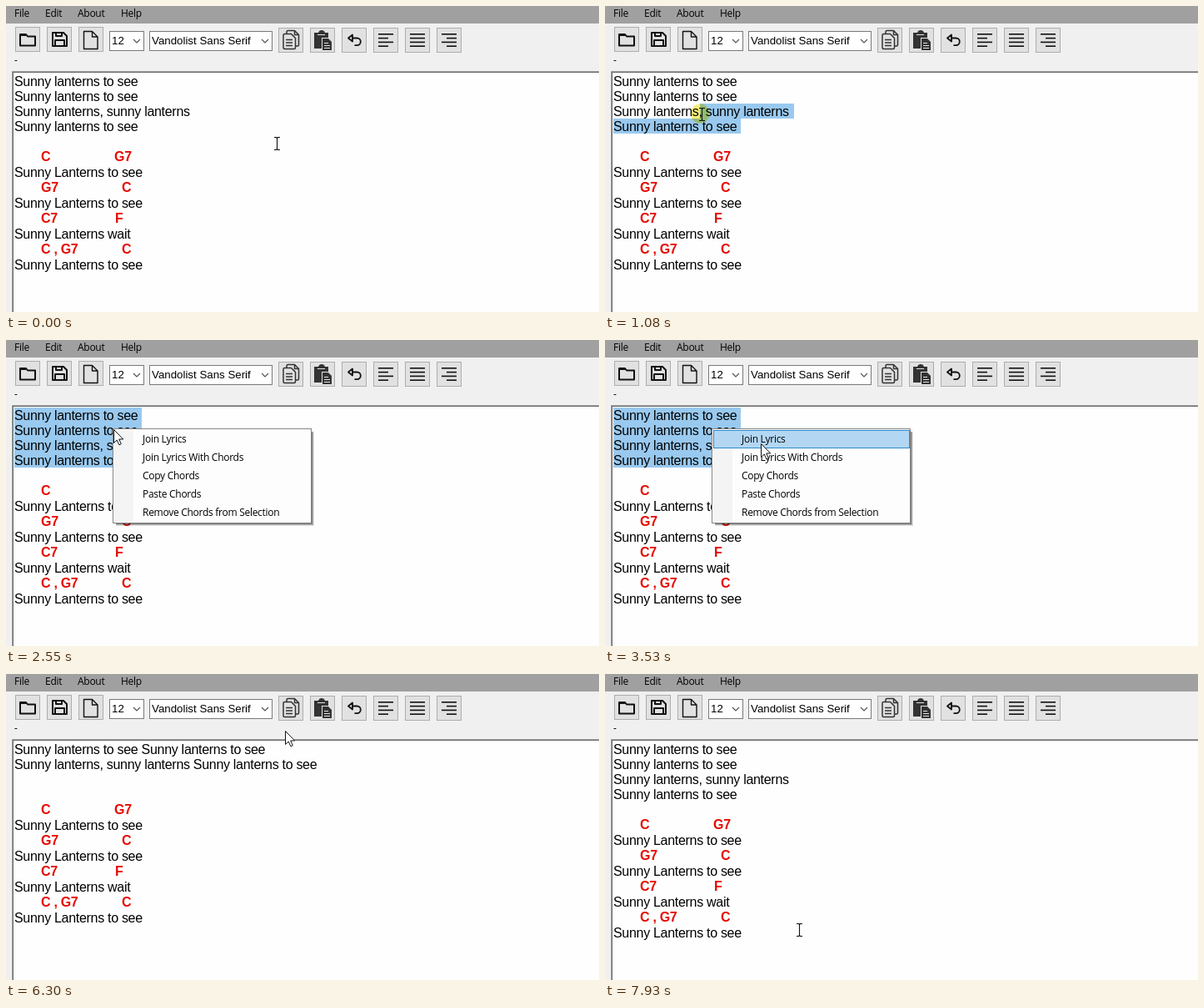
An HTML page that plays this animation: 712x367 px, repeating every 8 s.

```html
<!DOCTYPE html>
<html lang="en">
<head>
<meta charset="utf-8">
<title>Chord sheet editor</title>
<style>
  html, body { margin: 0; width: 100%; height: 100%; overflow: hidden; background: #f0f0f0; }
  svg { display: block; width: 712px; height: 367px; }
  text { white-space: pre; }
  .ui { font: 12px "Open Sans", sans-serif; letter-spacing: -.28px; fill: #000; }
  .combo { font: 13.3px "Liberation Sans", Arial, sans-serif; }
  .lyric, .chord { font: 16px "Liberation Sans", Arial, sans-serif; letter-spacing: -.3px; fill: #000; }
  .chord { font-weight: bold; fill: #e60a00; }
  .line { fill: none; stroke: #111; stroke-width: 2; stroke-linejoin: round; }
  .crisp { shape-rendering: crispEdges; }
  #spot { mix-blend-mode: multiply; }
</style>
</head>
<body>
<svg id="stage" viewBox="0 0 712 367" xmlns="http://www.w3.org/2000/svg"></svg>
<script>
const NS = 'http://www.w3.org/2000/svg';
const stage = document.getElementById('stage');
const LOOP = 8000, ROW = 18, TOP = 81, LEFT = 10;

function add(parent, tag, attrs = {}, content = '') {
  const el = document.createElementNS(NS, tag);
  for (const key in attrs) el.setAttribute(key, attrs[key]);
  el.textContent = content;
  return parent.appendChild(el);
}
const group = parent => add(parent, 'g');
const rect = (parent, x, y, width, height, fill, extra) =>
  add(parent, 'rect', { x, y, width, height, fill, class: 'crisp', ...extra });
const text = (parent, x, y, cls, content) => add(parent, 'text', { x, y, class: cls }, content);
const path = (parent, d, style = '') => add(parent, 'path', { d, class: 'line', style });
const frame = (parent, x, y, w, h, fill, stroke) =>
  rect(parent, x + .5, y + .5, w - 1, h - 1, fill, { stroke });
const show = (el, on) => el.setAttribute('visibility', on ? 'visible' : 'hidden');

// Window chrome
rect(stage, 0, 0, 712, 367, '#f0f0f0');
rect(stage, 0, 0, 712, 21, '#a0a0a0');
[['File', 10], ['Edit', 47], ['About', 86], ['Help', 138]].forEach(([s, x]) => text(stage, x, 13, 'ui', s));
text(stage, 10, 69, 'ui', '-');
rect(stage, 7, 78, 705, 289, '#a0a0a0');
rect(stage, 8, 79, 704, 288, '#696969');
rect(stage, 9, 80, 703, 287, '#fefefe');

const button = (x, y) => frame(stage, x, y, 30, 30, '#e1e1e1', '#adadad');
[11, 49, 87].forEach(x => button(x, 25));
[327, 365, 441, 479, 517].forEach(x => button(x, 26));
const undoButton = button(403, 26);

function combo(x, width, label) {
  frame(stage, x, 30, width, 24, '#fff', '#7a7a7a');
  text(stage, x + 3, 46, 'combo', label);
  path(stage, `M${x + width - 13} 40l4 4 4-4`, 'stroke:#555;stroke-width:1.1');
}
combo(124, 42, '12');
combo(172, 148, 'Vandolist Sans Serif');

// Toolbar icons
path(stage, 'M17 34h7l2 2.500h9v11h-18zM17 35h7');
path(stage, 'M56 32h13l4 4v12h-17zM60 32v4h7v-4M59 48v-7h11v7');
path(stage, 'M93.500 30.500h10l6.500 6.500v14.500h-16.500zM103.500 30.500v6.500h6.500', 'stroke-width:1.4');
path(stage, 'M337 33v-2q0-1.500 1.500-1.500h8l5 5v12q0 1.500-1.500 1.500h-2M346.500 29.500v5h5', 'stroke:#333;stroke-width:1.5');
path(stage, 'M334.500 33.500h8l5 5v11.500q0 1.500-1.500 1.500h-11.500q-1.500 0-1.500-1.500v-15q0-1.500 1.500-1.500M336 40.500h8M336 44h8M336 47.500h8', 'stroke:#333;stroke-width:1.5');
path(stage, 'M370 32h5q1-3 4-3t4 3h4v6h-8v13h-9z', 'fill:#333;stroke:none');
path(stage, 'M380 39h7l4 4v10h-11z', 'fill:#333;stroke:none');
path(stage, 'M374 34.500h9M382 44.500h5M382 47.500h7M382 50.500h7', 'stroke:#e1e1e1;stroke-width:1');
path(stage, 'M416 34.500v8l-5-4zM415 38.500h6.500a4.300 4.300 0 0 1 0 8.600h-3', 'stroke-width:1.8');
[[447, 0], [485, .5], [523, 1]].forEach(([x, align]) => {
  for (let i = 0; i < 4; i++) {
    const w = align === .5 || i % 2 === 0 ? 18 : 12;
    rect(stage, x + (18 - w) * align, 33 + i * 4.8, w, 1.6, '#111', { class: '' });
  }
});

// Document
const verse = 'Sunny lanterns to see';
const refrain = 'Sunny lanterns, sunny lanterns';
const rowEnds = [163, 163, 227, 163];
const bars = rowEnds.map((_, i) => rect(stage, LEFT, TOP + i * ROW, 0, ROW, '#99c9ef'));

function lyrics(lines) {
  const g = group(stage);
  lines.forEach((s, i) => text(g, LEFT, 96 + i * ROW, 'lyric', s));
  return g;
}
const split = lyrics([verse, verse, refrain, verse]);
const joined = lyrics([`${verse} ${verse}`, `${refrain} ${verse}`]);

const song = group(stage);
[
  ['C', 'G7', 130, 'to see'],
  ['G7', 'C', 139, 'to see'],
  ['C7', 'F', 131, 'wait'],
  ['C , G7', 'C', 139, 'to see']
].forEach(([first, second, x, tail], i) => {
  const y = 186 + i * 37;
  text(song, 42, y, 'chord', first);
  text(song, x, y, 'chord', second);
  text(song, LEFT, y + 19, 'lyric', `Sunny Lanterns ${tail}`);
});
const caret = rect(stage, LEFT, 136, 1, 17, '#000');

// Context menu
const menu = group(stage);
[.12, .2, .3].forEach((a, i) => rect(menu, 132, 110, 238 - i, 113 - i, `rgba(0,0,0,${a})`));
frame(menu, 128, 106, 239, 114, '#fdfdfd', '#868686');
rect(menu, 130, 108, 23, 110, '#f4f4f4');
const hover = frame(menu, 130, 108, 236, 22, '#b3d7f3', '#2b8ad0');
['Join Lyrics', 'Join Lyrics With Chords', 'Copy Chords', 'Paste Chords', 'Remove Chords from Selection']
  .forEach((s, i) => text(menu, 164, 123 + i * 22, 'ui', s));

// Pointer
const spot = add(stage, 'circle', { id: 'spot', r: 11.5, fill: '#f6ee78' });
const beam = path(stage, 'M-1 -6.500h2.500l1 1 1-1h2.500M2.500 -5.500v13M-1 8.500h2.500l1-1 1 1h2.500', 'stroke-width:1.1');
const arrow = path(stage, 'M.5 .5v16l3.700-3.500 2.700 5.800 2.400-1.100-2.600-5.700h5z', 'fill:#fff;stroke-width:1');

// start, end, steps, x, y [, bend x, bend y]
const home = [323, 164];
const moves = [
  [130, 870, 12, 161, 139],
  [940, 1550, 10, LEFT, 84, 82, 127],
  [1820, 2350, 8, 129, 107],
  [3020, 3330, 5, 182, 125],
  [3530, 3530, 1, 187, 124],
  [3670, 3670, 1, 187, 123],
  [5130, 5890, 12, 272, 93],
  [6160, 6510, 6, 418, 37, 325, 71],
  [7590, 7930, 6, 231, 306]
];

function pointer(t) {
  let [px, py] = home;
  for (const [t0, t1, n, x, y, bx, by] of moves) {
    if (t < t0) break;
    const k = n === 1 ? 1 : Math.min(n, Math.floor((t - t0) / (t1 - t0) * (n - 1) + 1e-6) + 1);
    let p = k / n;
    if (bx === undefined) {
      p = p * p * (3 - 2 * p);
      px += (x - px) * p;
      py += (y - py) * p;
    } else {
      const q = 1 - p;
      px = q * q * px + 2 * q * p * bx + p * p * x;
      py = q * q * py + 2 * q * p * by + p * p * y;
    }
  }
  return [px, py];
}

const within = (t, ...spans) => spans.some(([a, b]) => t >= a && t < b);

function draw(t) {
  const [x, y] = pointer(t);
  const isJoined = within(t, [4670, 7200]);
  const menuOpen = within(t, [2480, 4670]);
  const useArrow = menuOpen || y < 78;

  show(split, !isJoined);
  show(joined, isJoined);
  song.setAttribute('transform', `translate(0 ${isJoined ? -ROW : 0})`);
  show(caret, within(t, [4670, 5200], [5720, 6230], [6740, 7200]));
  show(menu, menuOpen);
  show(hover, within(t, [3020, 4670]));

  const selecting = within(t, [940, 4670]);
  const [sx, sy] = t < 1820 ? [x, y] : [LEFT, 84];
  const row = Math.max(0, Math.min(3, Math.floor((sy - TOP) / ROW)));
  bars.forEach((bar, i) => {
    const start = i === row ? Math.min(sx, rowEnds[i]) : LEFT;
    bar.setAttribute('x', start);
    bar.setAttribute('width', rowEnds[i] - start);
    show(bar, selecting && i >= row);
  });

  const overUndo = x >= 403 && x < 433 && y >= 26 && y < 56;
  undoButton.setAttribute('fill', overUndo ? '#e5f1fb' : '#e1e1e1');
  undoButton.setAttribute('stroke', overUndo ? '#0078d7' : '#adadad');

  show(spot, within(t, [940, 1820], [4470, 4670], [6780, 7130]));
  spot.setAttribute('cx', x);
  spot.setAttribute('cy', y);
  show(beam, !useArrow);
  show(arrow, useArrow);
  const place = `translate(${Math.round(x)} ${Math.round(y)})`;
  beam.setAttribute('transform', place);
  arrow.setAttribute('transform', place);
}

const begin = performance.now();
function tick(now) {
  draw(Math.max(0, now - begin) % LOOP);
  requestAnimationFrame(tick);
}
draw(0);
requestAnimationFrame(tick);
</script>
</body>
</html>
```
